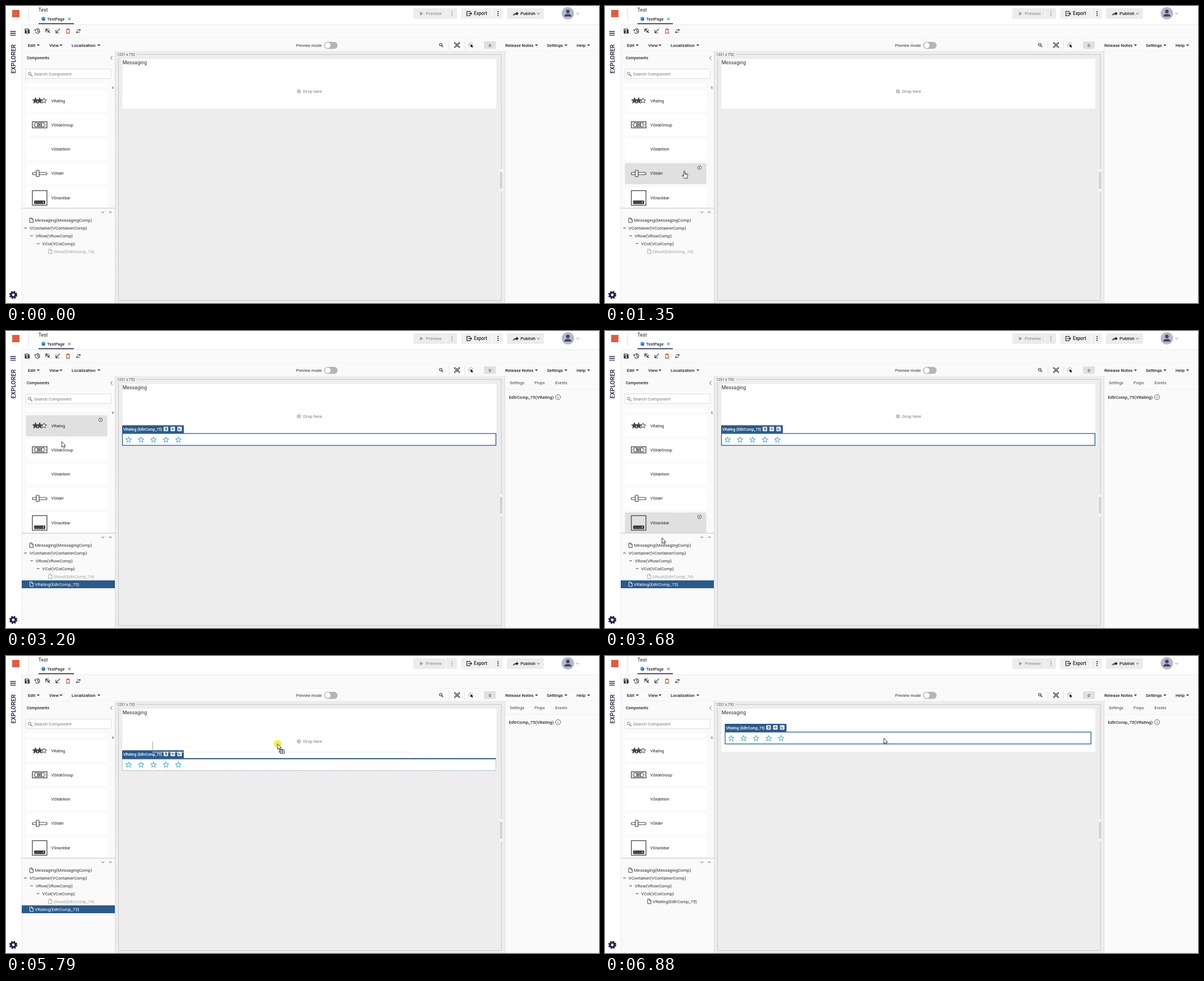
An HTML page for the animation above (8000 ms loop, 1057 by 530 pixels).

```html
<!DOCTYPE html>
<html lang="en">
<head>
<meta charset="utf-8">
<title>Page builder</title>
<style>
  html, body { margin: 0; width: 100%; height: 100%; overflow: hidden; background: #fafafa; }
  svg { display: block; width: 1057px; height: 530px; font-family: Roboto, sans-serif; }
  .medium { font-weight: 500; }
</style>
</head>
<body>
<svg id="stage" viewBox="0 0 1057 530"></svg>
<script>
const LOOP = 8000, INK = '#303030', NAVY = '#1d2344', BLUE = '#2b5a8a', SLATE = '#7d97b3';

// Drawing helpers: text is placed by its vertical centre.
const text = (x, y, size, s, fill = INK, more = '') =>
  `<text x="${x}" y="${y + size * .36}" font-size="${size}" fill="${fill}" ${more}>${s}</text>`;
const bold = (x, y, size, s, fill) => text(x, y, size, s, fill, 'class="medium"');
const rect = (x, y, w, h, fill, more = '') =>
  `<rect x="${x}" y="${y}" width="${w}" height="${h}" fill="${fill}" ${more}/>`;
const box = (x, y, w, h, stroke, more = '') => rect(x, y, w, h, 'none', `stroke="${stroke}" ${more}`);
const line = (d, stroke = INK, width = 1, more = '') =>
  `<path d="${d}" fill="none" stroke="${stroke}" stroke-width="${width}" ${more}/>`;
const shape = (d, fill = INK, more = '') => `<path d="${d}" fill="${fill}" ${more}/>`;
const circle = (x, y, r, fill, more = '') => `<circle cx="${x}" cy="${y}" r="${r}" fill="${fill}" ${more}/>`;
const group = (id, content, more = '') => `<g id="${id}" ${more}>${content}</g>`;
const caret = (x, y) => shape(`M${x - 2.8} ${y - 1.2}h5.6l-2.8 2.8z`);
const chevron = (x, y, dir, color, r = 2.4) => line(`M${x - r} ${y - dir * r / 2}l${r} ${dir * r}l${r} ${-dir * r}`, color, 1);
const kebab = (x, color) => [10, 13.5, 17].map(y => circle(x, y, 1.05, color)).join('');
const info = (x, y, r) => circle(x, y, r, 'none', 'stroke="#444" stroke-width=".8"') +
  line(`M${x} ${y - .6}v${r * .6}M${x} ${y - r * .55}v.9`, '#444', .9);

function star(x, y, r, fill, stroke) {
  const points = Array.from({ length: 10 }, (_, i) => {
    const a = i * Math.PI / 5, d = i % 2 ? r * .42 : r;
    return `${x + d * Math.sin(a)},${y - d * Math.cos(a)}`;
  });
  return `<polygon points="${points.join(' ')}" fill="${fill}" stroke="${stroke}" stroke-width="1"/>`;
}

function header() {
  return rect(0, 0, 1057, 33, '#fff') + rect(0, 33, 28, 497, '#fff') +
    line('M28 33.5H1057', '#e8e8e8') + line('M28 57.5H1057M28 80.5H1057', '#f2f2f2') +
    line('M28.5 33V530', '#e9e9e9') +
    rect(11, 7, 13, 13, '#e25c41') + line('M40.5 2V27', '#ddd') +
    text(57.8, 7.3, 8.7, 'Test', '#222') + circle(66.7, 23, 3.4, '#2b78b8') +
    [[65, 22.6], [66.2, 21], [68.2, 21.3]].map(([x, y]) => circle(x, y, .6, '#fff')).join('') +
    bold(73.5, 23, 7.3, 'TestPage', '#222') + line('M110.8 20.8l4.6 4.6m0-4.6l-4.6 4.6', '#2b5a8a') +
    rect(58, 30.7, 63, 1.6, NAVY) +
    rect(726, 4, 78, 19, '#ececec', 'rx="2"') + line('M784.5 4v19', '#fafafa') +
    shape('M738 10.2l5.6 3.4l-5.6 3.4z', '#999') + bold(748.3, 13.5, 8, 'Preview', '#999') + kebab(795, '#999') +
    rect(811, 4, 75, 19, '#f0f0f0', 'rx="2"') + line('M866.5 4v19', '#fff') + kebab(877, '#222') +
    line('M827 11.5v-2h-5.5v8h5.5v-2M824 13.5h6m-2-2l2 2l-2 2', '#222', 1.2) + bold(834, 13.5, 8.2, 'Export', '#222') +
    rect(893, 4, 66, 19, '#ececec', 'rx="2"') +
    shape('M906 17q.3-4.6 4-4.8v-2l3.8 3.3l-3.8 3.3v-2q-2.6 0-4 2.2z M903.3 16.5l2.8-3.6l.8.7l-2.4 3.1z', '#222') +
    bold(917, 13.5, 8, 'Publish', '#222') + chevron(949, 13.5, 1, '#444') +
    circle(1001.5, 13, 11, '#b5b8c9') + circle(1001.5, 9.7, 3.2, '#42455f') +
    shape('M995 18.8q0-4.6 6.5-4.6t6.5 4.6z', '#42455f') + chevron(1019, 13.5, 1, '#777') +
    line('M7.5 45.5h10M7.5 48.8h10M7.5 52.1h10', NAVY, 1.4) +
    bold(0, 0, 10.7, 'EXPLORER', NAVY).replace('<text', '<text transform="translate(13.5 120.5) rotate(-90)"') +
    circle(13, 515.5, 4, 'none', `stroke="${NAVY}" stroke-width="3.2"`) +
    circle(13, 515.5, 6, 'none', `stroke="${NAVY}" stroke-width="2.4" stroke-dasharray="2.8 1.91"`);
}

function toolbar() {
  const menus = [[39, 'Edit', 57.5], [77, 'View', 98], [117, 'Localization', 165.5],
    [890, 'Release Notes', 945.5], [964, 'Settings', 998], [1017, 'Help', 1038.5]];
  return shape('M33.5 40.5h6.5l2 2v6.5h-8.5z') + rect(35, 41.7, 4.5, 2, '#fafafa') + circle(37.8, 46.5, 1.4, '#fafafa') +
    line('M52.6 42.5a4 4 0 1 1 -.2 4M51.5 41.5v2.5h2.5M56.5 42v3l2 1.2', INK, 1.1) +
    line('M71 46.5v-5.5h5.5M71.5 41.5l6.5 6.5M74 47l4-4', INK, 1.2) +
    line('M89 42.5v5.5h5.5M89.3 47.7l6.7-7', INK, 1.2) +
    line('M107 42h7M109 41h3M108 43.5v5h5v-5', '#d9532c', 1.3) +
    line('M126.5 42.7h5M131.5 46.7h-5', INK, 1.1) + shape('M130.8 40.7l2.6 2l-2.6 2zM127.2 44.7l-2.6 2l2.6 2z') +
    menus.map(([x, s, c]) => bold(x, 70, 7.8, s, '#222') + caret(c, 70)).join('') +
    text(517, 70, 7.3, 'Preview mode') +
    rect(567, 64, 24, 12.5, '#b5b5b5', 'rx="6.2"') + circle(573.5, 70.2, 5, '#fff') +
    circle(775, 69, 2.2, 'none', 'stroke="#333" stroke-width="1.1"') + line('M776.6 70.6l2.6 2.6', INK, 1.3) +
    line('M789.5 62v16M817.5 62v16', '#e2e2e2') +
    line('M799.5 67.5v-2h2M806.5 65.5h2v2M808.5 72v2h-2M801.5 74h-2v-2', INK, 1.1) +
    box(801.8, 67.5, 4.5, 4.5, INK) + line('M800 66l8 8M808 66l-8 8', INK, .8) +
    shape('M828 68l5 3.5l-2 .5l1 2l-1.2.5l-1-2l-1.6 1z', '#111') +
    line('M828.5 64.5v2M825 66l1.3 1.3M824 69.5h2M832 66l-1.3 1.3M825 73l1.3-1.3', '#555', .9) +
    rect(852, 63, 21, 13.5, '#e0e0e0', 'rx="2"') + text(860.3, 70, 8, '0');
}

const ITEM_H = 37.5, itemTop = i => 150.5 + 43.3 * i;
const items = [
  ['VRating', star(52.5, 169, 5.6, '#444', '#444') + star(60, 169, 5.6, '#444', '#444') + star(67.7, 169, 5, '#fff', '#444')],
  ['VSlideGroup', box(47, 206.5, 26, 11, '#444', 'stroke-width="1.3"') +
    [51.5, 57.5, 63.5].map(x => box(x, 208.5, 4.5, 7, '#444')).join('') + rect(58.7, 210, 2, 4, '#444') +
    line('M50 210.5l-1.3 1.5l1.3 1.5M70 210.5l1.3 1.5l-1.3 1.5', '#444', .8)],
  ['VSlideItem', ''],
  ['VSlider', rect(47, 297, 26, 4, '#fff', 'rx="2" stroke="#444" stroke-width="1.2"') +
    rect(54, 293, 5, 11.5, '#fff', 'rx="1" stroke="#444" stroke-width="1.2"')],
  ['VSnackbar', box(47, 329.5, 26, 26, '#444', 'stroke-width="1.3"') + rect(50, 347, 20, 6.5, '#444', 'rx="1.5"') +
    line('M66.5 348.5v3', '#fff', .9)]
];

function palette() {
  const list = items.map(([name, icon], i) => {
    const y = itemTop(i);
    return rect(35.5, y, 145, ITEM_H, '#fff', `rx="2" id="item${i}"`) + icon +
      text(80.8, y + 18.5, 7.05, name, '#222') + group('info' + i, info(168.5, y + 8, 3.3));
  }).join('');
  return bold(37, 92.5, 7, 'Components', '#222') + line('M189.5 89.5l-3 3.2l3 3.2', '#555') +
    rect(35.5, 112.5, 152, 17, '#fff', 'stroke="#dedede" rx="1"') +
    circle(42, 120.5, 2.5, 'none', 'stroke="#777" stroke-width="1"') + line('M44 122.5l3 3', '#777', 1.2) +
    text(50, 121.3, 7.85, 'Search Component', '#777') +
    `<g clip-path="url(#listClip)">${rect(35.5, 130, 145, 14.5, '#fff', 'rx="2"')}${list}</g>` +
    rect(189, 143.5, 3, 4.5, '#aaa', 'rx="1"') + line('M194.5 80V530', '#d8d8d8') +
    line('M28 360.8H194', '#c4c4c4') + chevron(172.7, 368, 1, BLUE) + chevron(186, 368, -1, BLUE);
}

const rowY = i => 382.3 + 13.9 * i;
const sheet = (x, y, color) =>
  line(`M${x} ${y - 4}h3.5l2.5 2.5v5.5h-6zM${x + 3.3} ${y - 4}v2.7h2.7`, color, .9);
function tree() {
  const branch = (i, x, s) => line(`M${x - 9.5} ${rowY(i)}h4.5`, '#333', 1) + text(x, rowY(i), 7.75, s);
  const leaf = (i, x, s, color) => sheet(x - 9, rowY(i), color) + text(x, rowY(i), 7.75, s, color);
  return rect(28, 0, 166, 13.9, '#ececec', 'id="rowHover"') +
    leaf(0, 51.5, 'Messaging(MessagingComp)') +
    branch(1, 42, 'VContainer(VContainerComp)') + branch(2, 53, 'VRow(VRowComp)') + branch(3, 64.5, 'VCol(VColComp)') +
    group('treeGhost', leaf(4, 85, 'Ghost(EdtrComp_74)', '#a0a0a0')) +
    group('treeSelected', rect(28, 445, 166, 14, BLUE) + leaf(5, 51.5, 'VRating(EdtrComp_75)', '#fff')) +
    group('treeFinal', leaf(4, 85, 'VRating(EdtrComp_75)', INK));
}

// Name tag, with three tool buttons when their first position is given.
function tag(x, y, w, s, fill, color, first) {
  const glyphs = ['M-1.8-2h2.6v2.6M-1-1h2.8v3h-2.8z', 'M-2.6 0h5.2M0-2.6v5.2', 'M-1.8-2.2v4h3.6M-1.8 0h3.6'];
  return rect(x, y, w, 14.5, fill, 'rx="1"') + text(x + 2, y + 7.4, 6.6, s, color, color === '#fff' ? 'class="medium"' : '') +
    (first ? glyphs.map((d, i) => `<g transform="translate(${x + first + 12.2 * i} ${y + 6.5})">` +
      rect(-4, -4, 8, 8, '#f4f6f8', 'rx="1"') + line(d, BLUE, .9) + '</g>').join('') : '');
}
function rating(x, y, w, id) {
  const stars = Array.from({ length: 5 }, (_, i) => star(x + 11.5 + 22.2 * i, y + 11.5, 5.3, 'none', '#20a9c9')).join('');
  return rect(x, y, w, 21.5, '#fff') + stars +
    group(id, box(x + .6, y + .2, w - .8, 21.2, BLUE, 'stroke-width="1.3"')) +
    tag(x, y - 14.5, 110, 'VRating (EdtrComp_75)', BLUE, '#fff', 78);
}
const dashed = (x, y, w, h) => box(x, y, w, h, '#6f8bab', 'stroke-dasharray="2 1.6" stroke-width=".9"');

function canvasArea() {
  return rect(195, 80.5, 694.5, 449.5, '#ededed') +
    line('M234 86.5H883V525.5H200.5V92', '#a2a2a2', 1, 'stroke-dasharray="1 1"') +
    text(198, 86.5, 6.5, '1231 x 792', '#555') + line('M889.5 80V530', '#dedede') +
    rect(880, 291, 6, 40, '#f5f5f5') + line('M881.5 296v30M883.8 296v30', '#aaa') +
    rect(207.5, 94.5, 666.5, 76.5, '#fff') +
    group('empty', rect(207.5, 170, 666.5, 13, '#fff') + circle(522, 152.3, 2.9, 'none', 'stroke="#777" stroke-width=".9"') +
      circle(522, 152.3, 1.1, '#777') + text(529.7, 152.3, 7.85, 'Drop here', '#777')) +
    text(207.7, 100.7, 8.9, 'Messaging') +
    group('colHover', dashed(207.5, 128.5, 665.5, 47) + dashed(213.5, 135.5, 653, 33.5) +
      tag(207, 114, 93, 'VCol (VColComp)', SLATE, NAVY, 60.5) + tag(213.5, 121, 56.5, 'VCol (VColComp)', SLATE, NAVY)) +
    group('containerHover', dashed(207.5, 121.5, 665.5, 61) +
      tag(207, 107, 133, 'VContainer (VContainerComp)', SLATE, NAVY, 100)) +
    group('selected', rating(207, 182.7, 666.5, 'solidFrame') +
      group('dragFrame', dashed(207.5, 183, 665.5, 21.3) + line('M207 183.2H873', BLUE, 2))) +
    group('final', rating(213.5, 135.5, 653, 'finalFrame'));
}

function properties() {
  return group('props', text(898, 92.5, 7.1, 'Settings', '#444') + text(942, 92.5, 7.1, 'Props', '#444') +
    text(979.3, 92.5, 7.1, 'Events', '#444') + line('M890 104.5H1057', '#f0f0f0') +
    bold(896.5, 118, 7.75, 'EdtrComp_75(VRating)') + info(984, 118, 4.5));
}

function pointer() {
  const edge = 'stroke="#222" stroke-width=".9" stroke-linejoin="round"';
  return group('pointer',
    group('dragImage', line('M-222.5-4v15', '#999', 1) + line('M-223 15H240', '#ececec', 1)) +
    circle(0, 0, 7, '#f7f03c', 'id="press" opacity=".85"') +
    group('arrow', shape('M0 0v10l2.3-2l1.6 3.2l1.5-.7l-1.5-3.1h2.9z', '#fff', edge)) +
    group('hand', shape('M-1.1 1q1.1-1.6 2.2 0v4l4 .9q1 .3.9 1.6l-.7 4.5v1.5h-5.5l-4-4.5q-.2-1.4 1.4-1l1.7 1.2z', '#fff', edge) +
      line('M1.1 5v2.2M2.8 5.4v2M4.4 5.8v1.8', '#222', .7)) +
    group('copyMark', rect(3, 10, 6, 5, '#fff', 'stroke="#222" stroke-width=".9"') +
      rect(5, 11.5, 7, 6, '#fff', 'stroke="#222" stroke-width=".9"') + line('M6.7 14.5h3.6M8.5 12.7v3.6', '#222', .9)));
}

const stage = document.getElementById('stage');
stage.innerHTML = '<clipPath id="listClip"><path d="M28 138H194V360H28z"/></clipPath>' +
  header() + toolbar() + palette() + tree() + canvasArea() + properties() + pointer();

const $ = id => document.getElementById(id);
const show = (id, on) => { $(id).style.display = on ? '' : 'none'; };

// Pointer path: time, x, y.
const path = [
  [320, 930, 499], [560, 560, 425], [720, 230, 350], [790, 172, 339], [870, 162.5, 335], [1080, 160, 336],
  [1150, 157, 330], [1840, 104, 206], [2030, 104, 206], [2100, 101, 190], [2170, 99.5, 184.5], [2440, 98, 172],
  [3130, 98, 172], [3200, 99.5, 197], [3500, 104, 310], [3950, 98, 457], [4020, 101, 455], [4480, 385, 240],
  [4680, 427, 163], [4820, 430, 181], [4960, 430, 181], [5220, 430, 190], [5360, 430, 190],
  [5790, 484, 156.5], [6080, 492, 151], [6180, 494, 149], [6330, 497, 146.5]
];
function pointerAt(t) {
  const i = path.findIndex(p => p[0] > t);
  if (i < 1) return path[i ? path.length - 1 : 0].slice(1);
  const [t0, x0, y0] = path[i - 1], [t1, x1, y1] = path[i], k = (t - t0) / (t1 - t0);
  return [x0 + (x1 - x0) * k, y0 + (y1 - y0) * k];
}

function draw(t) {
  const within = (a, b) => t >= a && t < b;
  const [x, y] = pointerAt(t), [hx, hy] = pointerAt(t - 70); // hover trails the pointer
  const dragging = within(5360, 6660), beside = within(5430, 5930);

  items.forEach((_, i) => {
    const over = hx > 36 && hx < 180 && hy > itemTop(i) && hy < Math.min(360, itemTop(i) + ITEM_H);
    $('item' + i).setAttribute('fill', over ? '#e0e0e0' : '#fff');
    show('info' + i, over);
  });
  const row = Math.floor((hy - 375.3) / 13.9);
  show('rowHover', hx < 194 && row >= 0 && row < 5);
  $('rowHover').setAttribute('y', 375.3 + 13.9 * row);

  for (const id of ['empty', 'treeGhost']) show(id, t < 6660);
  for (const id of ['selected', 'treeSelected']) show(id, within(2700, 6660));
  for (const id of ['final', 'treeFinal']) show(id, t >= 6660);
  show('props', t >= 2700);
  show('colHover', within(4650, 4890) || within(5930, 6660));
  show('containerHover', within(4890, 5220));
  show('solidFrame', !beside);
  show('dragFrame', beside);

  const hand = within(830, 3200);
  show('pointer', t >= 320);
  show('hand', hand);
  show('arrow', !hand);
  show('press', within(2580, 2720) || within(5220, 6660));
  show('dragImage', dragging);
  show('copyMark', dragging);
  $('pointer').setAttribute('transform', `translate(${x} ${y})`);
}

(function tick() {
  draw(performance.now() % LOOP);
  requestAnimationFrame(tick);
})();
</script>
</body>
</html>
```
